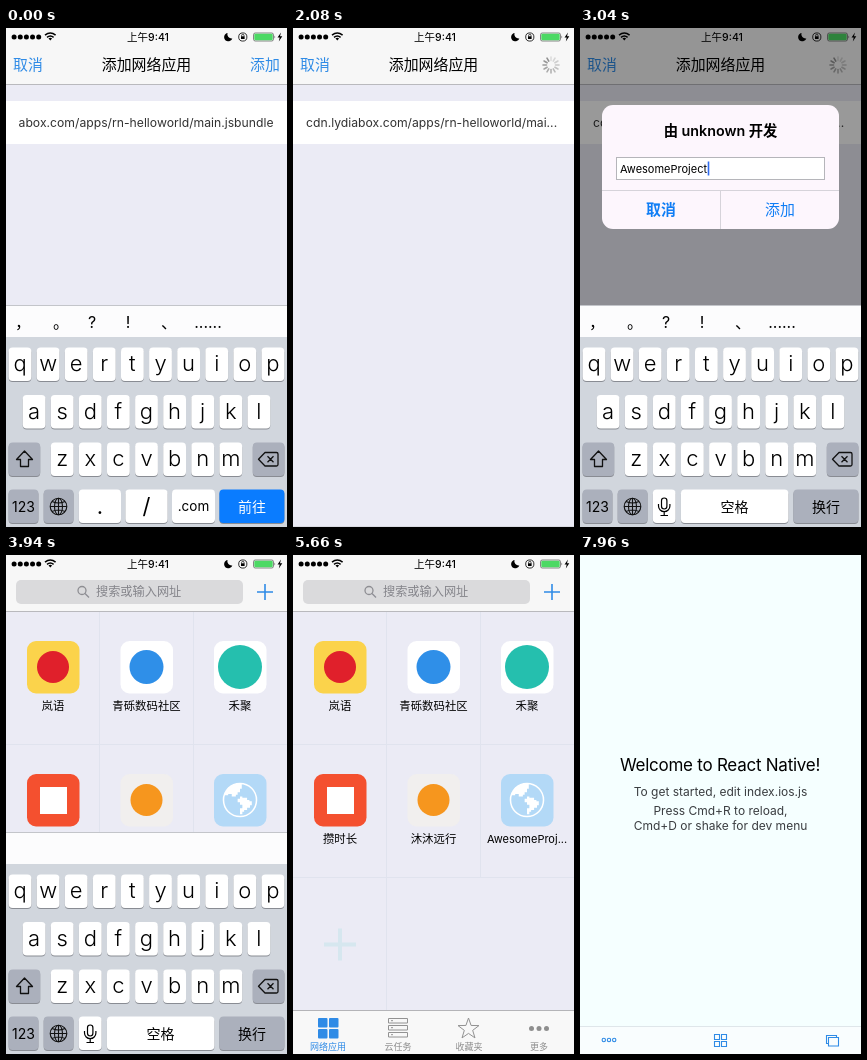
An HTML page that plays this animation: 281 by 499 pixels, repeating every 8 s.

```html
<!DOCTYPE html>
<html lang="zh-CN">
<head>
<meta charset="utf-8">
<title>添加网络应用</title>
<style>
html, body { margin: 0; width: 100%; height: 100%; overflow: hidden; background: #fff; }
svg { display: block; width: 281px; height: 499px; }
text { font-family: Inter, "Noto Sans CJK SC", "Noto Sans CJK", sans-serif; white-space: pre; }
.mid { text-anchor: middle; }
.blue { fill: #2f8be6; }
.line { fill: none; stroke: #2f8be6; }

.anim { animation: 8s linear infinite; }
.slide { animation-timing-function: cubic-bezier(.38, .7, .125, 1); }

.before { animation-name: before; }
.after { animation-name: after; }
.caret { animation-name: caret; }
.add { animation-name: add; }
.keysA { animation-name: keysA; }
.keysB { animation-name: keysB; }
.hints { animation-name: hints; }
.modal { animation-name: modal; }
.dim { animation-name: dim; }
.lift { animation-name: lift; }
.alert { animation-name: alert; transform-origin: 140.5px 139px; }
.caret2 { animation-name: caret2; }
.cell { animation-name: cell; }
.launch { animation-name: launch; }
.splash { animation-name: splash; }
.ready { animation-name: ready; }
.bar { animation-name: bar; }
.spin { animation: spin 1s steps(12) infinite; }

@keyframes before { 0%, 20.99% { opacity: 1 } 21%, 100% { opacity: 0 } }
@keyframes after { 0%, 20.99% { opacity: 0 } 21%, 100% { opacity: 1 } }
@keyframes caret {
  0%, 3.5% { opacity: 0 } 5.5%, 10.25% { opacity: 1 } 13%, 15% { opacity: 0 }
  18%, 20.99% { opacity: 1 } 21%, 100% { opacity: 0 }
}
@keyframes add { 0%, 17.25% { opacity: 1 } 18.5%, 20.99% { opacity: .3 } 21%, 100% { opacity: 0 } }
@keyframes keysA { 0%, 20.75% { transform: none } 26.75%, 100% { transform: translateY(222px) } }
@keyframes keysB {
  0%, 31.5% { transform: translateY(222px) } 37.5%, 60.5% { transform: none }
  66%, 100% { transform: translateY(222px) }
}
@keyframes hints { 0%, 42.24% { opacity: 1 } 42.25%, 100% { opacity: 0 } }
@keyframes modal { 0%, 46.25% { transform: none } 53%, 100% { transform: translateY(499px) } }
@keyframes dim { 0%, 31.5% { opacity: 0 } 34.5%, 42.5% { opacity: 1 } 46%, 100% { opacity: 0 } }
@keyframes lift { 0%, 31.5% { transform: translateY(110px) } 37.5%, 100% { transform: none } }
@keyframes alert {
  0%, 31.5% { opacity: 0; transform: scale(1.15) } 34.5%, 42.5% { opacity: 1; transform: none }
  46%, 100% { opacity: 0; transform: none }
}
@keyframes caret2 { 0%, 38.5% { opacity: 1 } 41%, 100% { opacity: 0 } }
@keyframes cell { 0%, 73.74% { opacity: 0 } 73.75%, 78% { opacity: 1 } 78.01%, 100% { opacity: 0 } }
@keyframes launch { 0%, 74% { opacity: 0 } 78%, 100% { opacity: 1 } }
@keyframes splash { 0%, 97.75% { opacity: 1 } 99.5%, 100% { opacity: 0 } }
@keyframes ready { 0%, 97.75% { opacity: 0 } 99.5%, 100% { opacity: 1 } }
@keyframes bar { 0%, 79.5% { transform: translateY(28px) } 84%, 100% { transform: none } }
@keyframes spin { to { transform: rotate(360deg) } }
</style>
</head>
<body>
<svg viewBox="0 0 281 499">
  <defs>
    <g id="globe">
      <circle r="28" fill="none" stroke="#fff" stroke-width="2.6"/>
      <path fill="#fff" d="M-27-9L-20-21L-6-28L3-27V-19H0V-13H-4V-9H-7V-6H-14V-10H-20V-8H-27z
        M-4-2H0V-6H4V-4H12V0H16V2H20V9H17V13H12V17H7V20H4V24H0V14H4V8H0V4H-4z"/>
    </g>
    <clipPath id="field"><rect x="12.5" y="80" width="256" height="30"/></clipPath>
  </defs>

  <!-- home -->
  <rect width="281" height="499" fill="#ebebf5"/>
  <path d="M93.5 57V456M187.5 57V322M0 189.5H281M0 322.5H281" stroke="#e0e3ee"/>
  <rect class="anim cell" x="188" y="190" width="93" height="132" fill="#d9d9e2"/>
  <g id="apps"></g>
  <path d="M31 389.5H63M47 373.5V405.5" stroke="#d6e7ef" stroke-width="4"/>
  <rect width="281" height="56" fill="#f7f7f7"/>
  <path d="M0 56.5H281" stroke="#b9b9bd"/>
  <rect x="10" y="25" width="227" height="24" rx="5" fill="#dadadc"/>
  <g fill="none" stroke="#8e8e93" stroke-width="1.3"><circle cx="76" cy="35.5" r="4"/><path d="M79 38.5L83 42.5"/></g>
  <text x="90" y="40.8" font-size="12.2" fill="#85858b">搜索或输入网址</text>
  <path class="line" stroke-width="1.6" d="M251 37H267M259 29V45"/>
  <rect y="455" width="281" height="44" fill="#f8f8f8"/>
  <path d="M0 455.5H281" stroke="#b4b4b8"/>
  <g class="blue">
    <rect x="25" y="463" width="9.5" height="9.5" rx="1"/><rect x="36" y="463" width="9.5" height="9.5" rx="1"/>
    <rect x="25" y="474" width="9.5" height="9.5" rx="1"/><rect x="36" y="474" width="9.5" height="9.5" rx="1"/>
  </g>
  <g fill="none" stroke="#929292">
    <path d="M95.5 463.5h19v4.5h-19zM95.5 470.5h19v4.5h-19zM95.5 477.5h19v4.5h-19zM98 465.7h2M98 472.7h2M98 479.7h2"/>
    <path id="star"/>
  </g>
  <g fill="#8e8e8e"><circle cx="238.5" cy="473.5" r="2.5"/><circle cx="246" cy="473.5" r="2.5"/><circle cx="253.5" cy="473.5" r="2.5"/></g>
  <g class="mid" font-size="9" fill="#8e8e8e">
    <text class="blue" x="35" y="495">网络应用</text><text x="105" y="495">云任务</text>
    <text x="176" y="495">收藏夹</text><text x="246" y="495">更多</text>
  </g>

  <!-- add form -->
  <g class="anim slide modal">
    <rect width="281" height="499" fill="#ebebf5"/>
    <rect width="281" height="56" fill="#f7f7f7"/>
    <path d="M0 56.5H281" stroke="#b9b9bd"/>
    <rect y="73" width="281" height="43" fill="#fff"/>
    <g font-size="14.9">
      <text class="blue" x="7" y="42">取消</text>
      <text class="mid" x="140.5" y="41.8" font-weight="500">添加网络应用</text>
      <text class="blue anim add" x="244" y="42">添加</text>
    </g>
    <g font-size="12.2" fill="#333">
      <g clip-path="url(#field)"><text class="anim before" x="267.5" y="99" text-anchor="end">cdn.lydiabox.com/apps/rn-helloworld/main.jsbundle</text></g>
      <text class="anim after" x="13" y="99">cdn.lydiabox.com/apps/rn-helloworld/mai...</text>
    </g>
    <rect class="anim caret" x="266.2" y="87" width="1.8" height="16" fill="#426bf2"/>
    <g class="anim after"><g transform="translate(258 37)"><g id="spinner" class="spin"></g></g></g>
  </g>

  <!-- status bar -->
  <g id="dots"></g>
  <g fill="none" stroke="#000" stroke-width="1.5">
    <path d="M39 7.2Q44.3 2.8 49.6 7.2M41 9.3Q44.3 6.6 47.6 9.3"/>
    <circle cx="236.8" cy="9" r="4.1" stroke-width=".8"/><path d="M235.6 8.5V7.5a1.2 1.2 0 0 1 2.4 0V8.5" stroke-width=".7"/>
  </g>
  <path d="M42.5 10.5Q44.3 9.2 46.1 10.5L44.3 12.5z"/>
  <rect x="235" y="8.3" width="3.6" height="2.7"/>
  <text class="mid" x="142" y="12.5" font-size="10.5" font-weight="500">上午9:41</text>
  <path d="M221.5 5A4.2 4.2 0 1 0 226.3 10.5A4.3 4.3 0 0 1 221.5 5z"/>
  <rect x="247.5" y="5" width="20" height="8" rx="1.8" fill="none" stroke="#555" stroke-width=".7"/>
  <rect x="248.3" y="5.8" width="18.4" height="6.4" rx="1" fill="#4cd964"/>
  <path d="M268.5 7.5q1.5 1.5 0 3z" fill="#555"/>
  <path d="M275 4.5L271.5 9.6H273.7L272.8 13.5L276.3 8.3H274z"/>

  <!-- alert -->
  <rect class="anim dim" width="281" height="499" fill="#000" fill-opacity=".4"/>
  <g class="anim slide lift"><g class="anim alert">
    <rect x="22" y="77" width="237" height="124" rx="11" fill="#fdf6fd"/>
    <text class="mid" x="140.5" y="108.3" font-size="14.3" font-weight="600">由 unknown 开发</text>
    <rect x="36.5" y="129.5" width="208" height="22" fill="#fff" stroke="#b5b5ba"/>
    <text x="40" y="145" font-size="11">AwesomeProject</text>
    <rect class="anim caret2" x="127.7" y="133.5" width="1.6" height="14" fill="#2f6bf0"/>
    <path d="M22 162.5H259M140.5 162.5V201" stroke="#d6d3da"/>
    <g class="mid" font-size="14.9" fill="#0f7df5">
      <text x="81" y="187" font-weight="600">取消</text><text x="200" y="187">添加</text>
    </g>
  </g></g>

  <!-- keyboards -->
  <g id="keysA" class="anim slide keysA"></g>
  <g id="keysB" class="anim slide keysB"></g>

  <!-- launched app -->
  <g class="anim launch">
    <rect width="281" height="499" fill="#fff"/>
    <g class="anim splash">
      <rect x="96.5" y="174" width="88" height="88" rx="9" fill="#e1eaff"/>
      <use href="#globe" x="140.5" y="217.5"/>
      <text class="mid" x="140.5" y="448" font-size="11.7" fill="#a9a9a9" style="font-family:'Noto Sans',sans-serif">unknown</text>
    </g>
    <g class="anim ready">
      <rect width="281" height="499" fill="#f5ffff"/>
      <g class="mid" font-size="12" fill="#3a3d40">
        <text x="140" y="215.5" font-size="17" letter-spacing="-.25" fill="#000">Welcome to React Native!</text>
        <text x="140.5" y="240.5">To get started, edit index.ios.js</text>
        <text x="140.5" y="259.5">Press Cmd+R to reload,</text>
        <text x="140.5" y="274.5">Cmd+D or shake for dev menu</text>
      </g>
    </g>
    <g class="anim slide bar">
      <rect y="471" width="281" height="28" fill="#f9fdfe"/>
      <path d="M0 471.5H281" stroke="#dfe6ea"/>
      <g class="line" stroke-width="1.1">
        <circle cx="23.8" cy="485" r="1.7"/><circle cx="29" cy="485" r="1.7"/><circle cx="34.2" cy="485" r="1.7"/>
        <path d="M134.5 479.5h5v5h-5zM141.5 479.5h5v5h-5zM134.5 486.5h5v5h-5zM141.5 486.5h5v5h-5z"/>
        <path d="M248.5 482.5h10v8.5h-10zM248.5 488.5H246.5V480.5H256.5V482.5"/>
      </g>
    </g>
  </g>
</svg>
<script>
const fill = (id, html) => { document.getElementById(id).innerHTML = html; };
const range = n => [...Array(n).keys()];
const label = (x, y, size, s, extra = '') =>
  `<text class="mid" x="${x}" y="${y}" font-size="${size}" ${extra}>${s}</text>`;

fill('dots', range(5).map(i => `<circle cx="${8.1 + i * 6.15}" cy="9" r="2.5"/>`).join(''));

fill('spinner', range(12).map(i =>
  `<path d="M0-4.5V-8" stroke="#777" stroke-width="1.6" stroke-linecap="round"
    opacity="${0.2 + i * 0.055}" transform="rotate(${i * 30})"/>`).join(''));

document.getElementById('star').setAttribute('d', 'M' + range(10).map(i => {
  const r = i % 2 ? 4.4 : 11, a = i * Math.PI / 5;
  return `${(175.5 + r * Math.sin(a)).toFixed(2)} ${(474 - r * Math.cos(a)).toFixed(2)}`;
}).join('L') + 'z');

// Home icons: name, tile colour, plain mark
const disc = (r, c) => `<circle cx="26" cy="26" r="${r}" fill="${c}"/>`;
const apps = [
  ['岚语', '#fbd34b', disc(16, '#e0202b')],
  ['青砾数码社区', '#fff', disc(17, '#2f8fe8')],
  ['禾聚', '#fff', disc(22, '#25bfae')],
  ['攒时长', '#f4502f', '<rect x="13" y="13" width="27" height="27" fill="#fff"/>'],
  ['沐沐远行', '#f1efee', disc(16, '#f6961e')],
  ['AwesomeProj...', '#b3d9f7', '<use href="#globe" transform="translate(26 26) scale(.59)"/>'],
];
fill('apps', apps.map(([name, tile, mark], i) => {
  const x = 21 + i % 3 * 93.5, y = 86 + (i > 2) * 133;
  return `<g transform="translate(${x} ${y})">
    <rect width="52.5" height="52.5" rx="9" fill="${tile}"/>${mark}
    ${label(26, 69, i < 5 ? 11.4 : 11, name)}</g>`;
}).join(''));

// Keyboard
const GREY = '#abb0bc', BLUE = '#0a7cff';
const key = (x, y, w, color = '#fff') =>
  `<rect x="${x}" y="${y + 1}" width="${w}" height="33.5" rx="4" fill="#898c93"/>
   <rect x="${x}" y="${y}" width="${w}" height="33.5" rx="4" fill="${color}"/>`;
const row = (letters, x0, y) => [...letters].map((c, i) => {
  const x = x0 + i * 28.1;
  return key(x, y, 22.8) + label(x + 11.4, y + 23.5, 22, c, 'font-weight="300"');
}).join('');

const icons = `<g fill="none" stroke="#111" stroke-width="1.3" stroke-linejoin="round">
  <path d="M18.5 423L26.5 431.5H22.5V438.5H14.5V431.5H10.5z"/>
  <path d="M259 424.5H270.5a1.5 1.5 0 0 1 1.5 1.5V436.5a1.5 1.5 0 0 1-1.5 1.5H259L252.5 431.2zM261.5 428.2l6 6M267.5 428.2l-6 6"/>
  <g stroke-width="1.1"><circle cx="52.5" cy="478.5" r="8.3"/><ellipse cx="52.5" cy="478.5" rx="4" ry="8.3"/>
  <path d="M52.5 470.2V486.8M44.2 478.5H60.8M46 473.5Q52.5 476.5 59 473.5M46 483.5Q52.5 480.5 59 483.5"/></g></g>`;
const mic = `<g fill="none" stroke="#000" stroke-width="1.2"><rect x="81.5" y="470" width="5.4" height="11" rx="2.7"/>
  <path d="M78.5 476V478a5.7 5.7 0 0 0 11.4 0V476M84.2 484V487.5M80.5 487.5H88"/></g>`;
const hints = [['，', 17], ['。', 55], ['?', 86], ['!', 122], ['、', 163], ['......', 202]]
  .map(([s, x]) => label(x, 300, 16, s)).join('');

const keyboard = (bottom, hintClass) => `
  <rect y="277" width="281" height="33" fill="#fcfcfd"/>
  <path d="M0 277.5H281" stroke="#c3c5ca"/>
  <g class="${hintClass}">${hints}</g>
  <rect y="309" width="281" height="190" fill="#d1d6dd"/>
  ${row('qwertyuiop', 2.6, 319.5)}${row('asdfghjkl', 16.7, 367)}${row('zxcvbnm', 44.8, 414.5)}
  ${key(2.6, 414.5, 31.6, GREY)}${key(246.8, 414.5, 31.6, GREY)}
  ${key(2.6, 461.5, 29.8, GREY)}${key(37.7, 461.5, 29.8, GREY)}
  ${icons}${label(17.5, 484, 14, '123')}${bottom}`;

fill('keysA', keyboard(
  key(72.8, 461.5, 42.2) + label(94, 486, 22, '.') +
  key(119.4, 461.5, 42.2) + label(140.5, 486, 22, '/') +
  key(166, 461.5, 43) + label(187.5, 483, 13.5, '.com') +
  key(213.4, 461.5, 65, BLUE) + label(246, 484, 14, '前往', 'fill="#fff"'), ''));

fill('keysB', keyboard(
  key(72.8, 461.5, 22.8) + mic +
  key(100.9, 461.5, 107.5) + label(154.5, 484, 14, '空格') +
  key(213.4, 461.5, 65, GREY) + label(246, 484, 14, '换行'), 'anim hints'));
</script>
</body>
</html>
```
